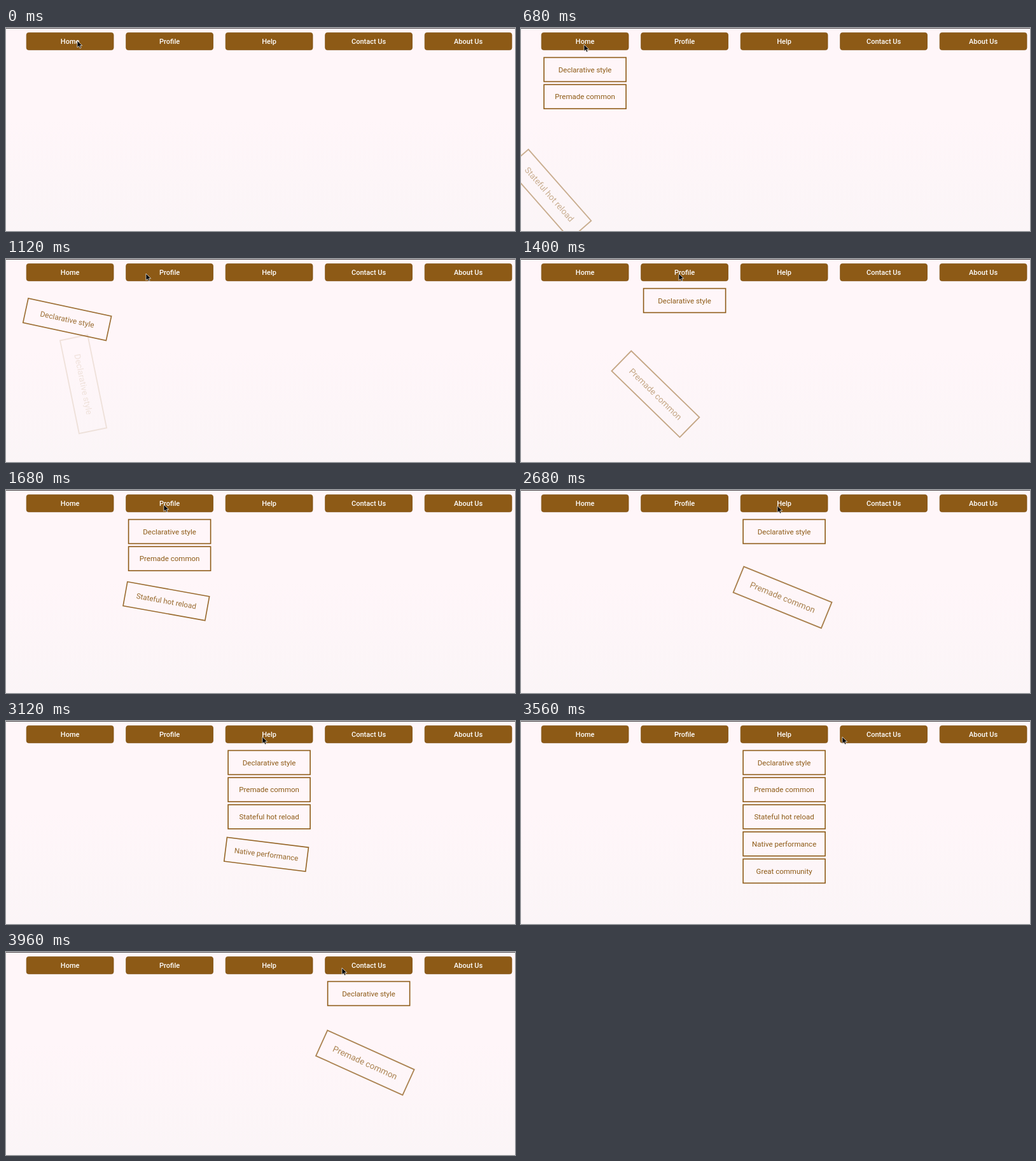
An HTML page that plays this animation: 800x320 px, repeating every 4000 ms.

```html
<!DOCTYPE html>
<html lang="en">
<head>
<meta charset="utf-8">
<title>Hover menu</title>
<style>
  html, body { margin: 0; width: 100%; height: 100%; overflow: hidden; }
  body { background: linear-gradient(#fff6f9 45%, #fbf5f7); }
  svg { display: block; width: 800px; height: 320px; }
  text { font-family: Roboto, sans-serif; text-anchor: middle; }
  .button rect { fill: #8d5a16; stroke: #7d4d0e; stroke-width: .8; }
  .button text { font-size: 11px; font-weight: 500; fill: #fff; }
  .item rect { fill: none; stroke: #8d5a16; stroke-width: 1.6; }
  .item text { font-size: 11.5px; fill: #8d5a16; }
</style>
</head>
<body>
<svg id="stage" viewBox="0 0 800 320"></svg>
<script>
const LOOP = 4000, TICK = 40, FIRST = 120;
const ITEM_TIME = 203, CLOSE_SPEED = 10;
const PIVOT = { x: -135, y: -28 };
const LABELS = ['Declarative style', 'Premade common', 'Stateful hot reload',
  'Native performance', 'Great community'];
const MENUS = [
  { name: 'Home', open: 181, close: 1050.6 },
  { name: 'Profile', open: 1094, close: 2297.7 },
  { name: 'Help', open: 2324, close: 3579 },
  { name: 'Contact Us', open: 3609, close: LOOP },
  { name: 'About Us', open: LOOP, close: LOOP }
];
// time, x, y of the pointer tip
const PATH = [
  [0, 112, 20], [160, 112, 20], [400, 99, 26], [960, 99, 26], [1120, 220, 23],
  [1160, 248, 23], [2200, 248, 23], [2280, 359, 23], [2320, 403, 25],
  [3480, 403, 25], [3560, 505, 25], [3600, 528, 25], [LOOP, 528, 25]
];

const stage = document.getElementById('stage');

function add(parent, tag, attrs, label) {
  const el = document.createElementNS('http://www.w3.org/2000/svg', tag);
  for (const key in attrs) el.setAttribute(key, attrs[key]);
  if (label) el.textContent = label;
  return parent.appendChild(el);
}

add(stage, 'rect', { width: 800, height: 1, fill: '#4a4649' });

MENUS.forEach((menu, m) => {
  menu.x = 100.6 + m * 156.5;
  const button = add(stage, 'g', { class: 'button', transform: `translate(${menu.x} 21)` });
  add(button, 'rect', { x: -68.4, y: -13.6, width: 136.8, height: 27.2, rx: 3.5 });
  add(button, 'text', { y: 3.7 }, menu.name);
});

MENUS.forEach(menu => {
  menu.items = LABELS.map(label => {
    const item = add(stage, 'g', { class: 'item' });
    add(item, 'rect', { x: -64.5, y: -19, width: 129, height: 38 });
    add(item, 'text', { y: 4 }, label);
    return item;
  });
});

const pointer = add(stage, 'path', {
  d: 'M0 0V10.6L2.5 8.4L4.2 12L6 11.2L4.4 7.7H7.8Z',
  fill: '#000', stroke: '#fff', 'stroke-width': .7
});

const clamp = (v, max = 1) => Math.min(max, Math.max(0, v));

function menuTime(menu, t) {
  const opened = clamp(Math.min(t, menu.close) - menu.open, ITEM_TIME * LABELS.length);
  return opened - CLOSE_SPEED * Math.max(0, t - menu.close);
}

// Each item swings in around a point up and to its left.
function pose(item, x, y, p) {
  const u = clamp((1 - p - .08) / .18);
  const scale = 1 + .16 * u * u * (3 - 2 * u);
  item.setAttribute('opacity', p);
  item.setAttribute('transform', `translate(${x + PIVOT.x} ${y + PIVOT.y})` +
    `rotate(${90 * (1 - p)})scale(${scale})translate(${-PIVOT.x} ${-PIVOT.y})`);
}

function draw(t) {
  for (const menu of MENUS) {
    const v = menuTime(menu, t) / ITEM_TIME;
    menu.items.forEach((item, i) => pose(item, menu.x, 65.5 + i * 42.75, clamp(v - i)));
  }
  const next = Math.max(1, PATH.findIndex(point => point[0] >= t));
  const [t0, x0, y0] = PATH[next - 1], [t1, x1, y1] = PATH[next];
  const k = (t - t0) / (t1 - t0);
  pointer.setAttribute('transform', `translate(${x0 + (x1 - x0) * k} ${y0 + (y1 - y0) * k})`);
}

const start = performance.now();
function frame() {
  const t = (performance.now() - start) % LOOP;
  draw(t < FIRST ? 0 : Math.floor(t / TICK) * TICK);
  requestAnimationFrame(frame);
}
frame();
</script>
</body>
</html>
```
